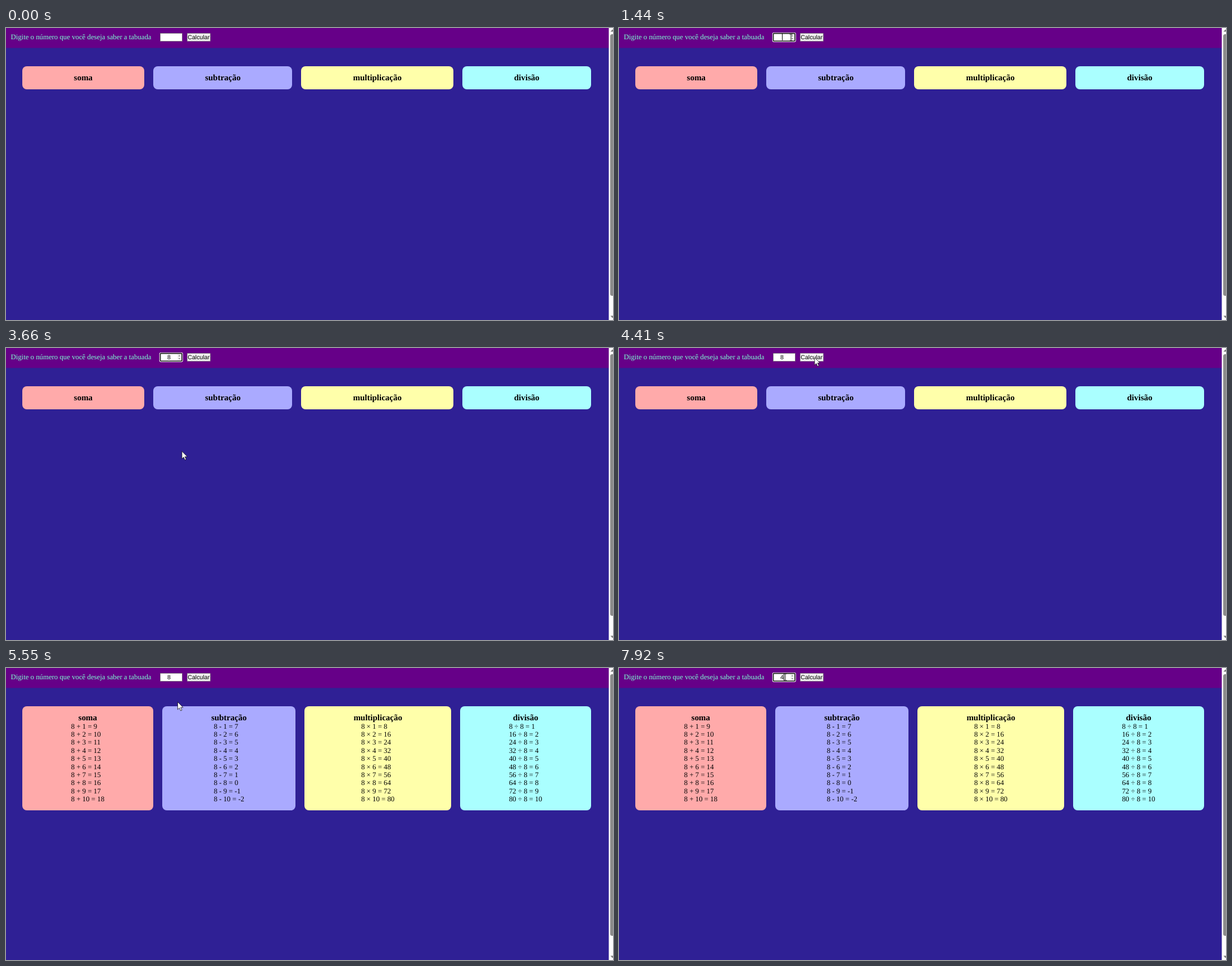
An HTML page that plays this animation: 1080x519 px, repeating every 8000 ms.

```html
<!DOCTYPE html>
<html lang="pt-BR">
<head>
<meta charset="utf-8">
<title>Tabuada</title>
<style>
  html, body { margin: 0; width: 100%; height: 100%; overflow: hidden; background: #2f2095; }
  body, text { font: 12.8px "Liberation Serif", "Times New Roman", serif; text-rendering: geometricPrecision; }
  svg { position: absolute; left: 0; top: 0; width: 1080px; height: 519px; }
  .ctl { font: 10.667px "Liberation Sans", Arial, sans-serif; text-anchor: middle; }
  main { position: absolute; left: 28.8px; top: 67.8px; width: 1012.2px; display: flex; gap: 16px; }
  section { flex: 1 1 auto; display: flex; flex-direction: column; align-items: center; padding: 12.8px 0 12px; border-radius: 8px; }
  h3 { margin: 0; font-size: 14.976px; line-height: 16px; }
  .rows { line-height: 14.4px; white-space: pre; }
</style>
</head>
<body>
<main id="cards"></main>
<svg viewBox="0 0 1080 519">
  <rect width="1073" height="35.5" fill="#660088"/>
  <text x="8.4" y="20" fill="#7fffd4">Digite o número que você deseja saber a tabuada</text>

  <rect x="1072.5" width="8" height="519" fill="#fcfcfc"/>
  <rect x="1075" y="11" width="8" height="465" rx="3.5" fill="#8b8b8b"/>
  <path d="M1075.5 6.5L1079 2.5L1082.5 6.5ZM1075.5 511.5L1079 515.5L1082.5 511.5Z" fill="#7d7d7d"/>

  <rect x="274.4" y="9.4" width="39" height="14.2" fill="#fff" stroke="#767676" stroke-width=".8"/>
  <g id="ring">
    <rect x="272.8" y="7.9" width="42" height="17" rx="2.6" fill="#fff"/>
    <rect x="274.6" y="9.6" width="38.4" height="13.6" rx="1" fill="#fff" stroke="#101010" stroke-width="1.6"/>
  </g>
  <g id="spin">
    <rect x="305" y="11" width="6.5" height="11" fill="#efefef"/>
    <path d="M306.6 14.8L308.4 12.6L310.2 14.8ZM306.6 18L308.4 20.2L310.2 18Z" fill="#8a8a8a"/>
  </g>
  <text id="value" class="ctl" x="290" y="20"></text>
  <rect id="caret" y="10" width="1" height="12"/>

  <rect id="button" x="322.4" y="9.4" width="41.2" height="14.2" rx=".6" stroke-width=".8"/>
  <text class="ctl" x="342.8" y="20">Calcular</text>

  <circle id="press" r="8.7" fill="#f8e800" opacity=".55"/>
  <path id="arrow" d="M0 0V13.4L3.1 10.5L5.3 15.6L7.5 14.6L5.3 9.7H9.6Z" fill="#fff" stroke="#111" stroke-width=".8"/>
  <path id="beam" d="M-2.5 -6H-.5L0 -5.5L.5 -6H2.5M0 -5.5V5.5M-2.5 6H-.5L0 5.5L.5 6H2.5" fill="none" stroke="#111"/>
</svg>
<script>
const LOOP = 8000, TICK = 66.7, BLINK = 530, PRESS = 130, N = 8;
const CLICK = { field: 1310, button: 4280, again: 6210 };
const RESULT = 4470, TYPE = 2990, ERASE = 7050, RETYPE = 7920;

const $ = id => document.getElementById(id);
const show = (el, on) => { el.style.visibility = on ? 'visible' : 'hidden'; };
const lastBefore = (t, times) => times.filter(s => s <= t).pop();

const ops = [
  ['soma', '#faa', i => `${N} + ${i} = ${N + i}`],
  ['subtração', '#aaf', i => `${N} - ${i} = ${N - i}`],
  ['multiplicação', '#ffa', i => `${N} × ${i} = ${N * i}`],
  ['divisão', '#aff', i => `${N * i} ÷ ${N} = ${i}`]
];
const rows = ops.map(([name, color, line]) => {
  const card = document.createElement('section');
  card.style.background = color;
  card.innerHTML = `<h3>${name}</h3><div class="rows"></div>`;
  card.lastChild.textContent = Array.from({ length: 10 }, (_, i) => line(i + 1)).join('\n');
  return $('cards').appendChild(card).lastChild;
});

// each move runs on from the previous end; bend bows the path sideways
const home = [877, 480];
const moves = [
  { start: 300, end: 1040, to: [302, 19], bend: -.29 },
  { start: 1120, end: 1120, to: [306, 17] },
  { start: 1640, end: 1870, to: [204, 225] },
  { start: 3370, end: 3370, to: [273, 218] },
  { start: 3520, end: 4150, to: [348, 17], bend: .35 },
  { start: 4950, end: 5140, to: [347, 233] },
  { start: 5340, end: 5670, to: [291, 0] },
  { start: 5820, end: 6150, to: [296, 16] }
];

function pointer(t) {
  const i = moves.filter(m => m.start <= t).length - 1;
  if (i < 0) return null;
  const { start, end, to, bend = 0 } = moves[i];
  const from = i ? moves[i - 1].to : home;
  const steps = Math.round((end - start) / TICK) + 1;
  const p = Math.min(1, (Math.floor((t - start) / TICK) + 1) / steps);
  const u = p * p * (3 - 2 * p), bow = 2 * u * (1 - u) * bend;
  const dx = to[0] - from[0], dy = to[1] - from[1];
  return [from[0] + dx * u - dy * bow, from[1] + dy * u + dx * bow];
}

const over = (p, left, right) => !!p && p[0] >= left && p[0] <= right && p[1] >= 9 && p[1] <= 24;

function draw(t) {
  const p = pointer(t);
  const inField = over(p, 274, 314), onButton = over(p, 322, 364);
  const focused = (t >= CLICK.field && t < CLICK.button) || t >= CLICK.again;
  const typed = t >= RETYPE ? '4' : t >= TYPE && t < ERASE ? '8' : '';
  const blinkStart = lastBefore(t, [CLICK.field, TYPE, CLICK.again, RETYPE]);
  const held = onButton && t >= CLICK.button && t < RESULT;

  for (const r of rows) r.style.display = t >= RESULT ? 'block' : 'none';
  show($('ring'), focused);
  show($('spin'), focused || inField);
  $('value').textContent = typed;
  show($('caret'), focused && (t - blinkStart) % (2 * BLINK) < BLINK);
  $('caret').setAttribute('x', typed ? 293 : 290);
  $('button').setAttribute('fill', held ? '#f5f5f5' : onButton ? '#e5e5e5' : '#efefef');
  $('button').setAttribute('stroke', held ? '#8d8d8d' : onButton ? '#4f4f4f' : '#767676');

  show($('arrow'), p && !inField);
  show($('beam'), inField);
  show($('press'), t - lastBefore(t, Object.values(CLICK)) < PRESS);
  if (p)
    for (const id of ['arrow', 'beam', 'press'])
      $(id).setAttribute('transform', `translate(${p[0].toFixed(1)} ${p[1].toFixed(1)})`);
}

const origin = performance.now();
function tick() {
  draw((performance.now() - origin) % LOOP);
  requestAnimationFrame(tick);
}
tick();
</script>
</body>
</html>
```
